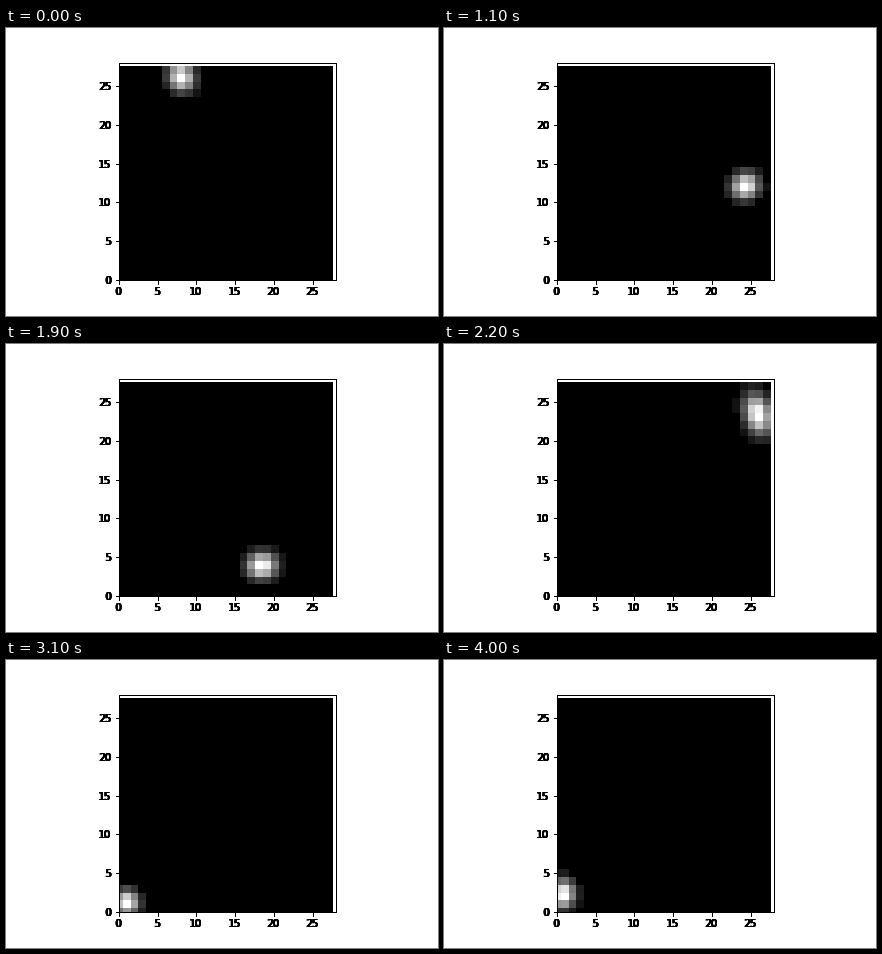
These frames come from a looping animation (432 px wide and 288 px high, 4.1 s). A matplotlib script:

```python
import numpy as np
import matplotlib.pyplot as plt
from matplotlib.animation import FuncAnimation
from matplotlib.transforms import Affine2D

SIZE = 28
FRAMES = 41
INTERVAL = 100
BASE_VAR = 1.35   # spread of a resting spot, in cells squared
BLUR = 0.02       # extra spread along the velocity
CUTOFF = 0.065

# Points where the spot turns: time step, x, y
TURNS = [
    (0, 8, 26.1), (3, 17, 2), (5, 21.5, 18.5), (6, 24, 25.5),
    (9, 3, 2), (11, 24.2, 12.1), (15, 3, 6), (16, 6, 2.3),
    (21, 26.6, 5), (22, 25.8, 23.4), (24, 17, 25), (30, 8, 5),
    (31, 0.9, 1.2), (36, 25, 25), (39, 2, 10), (40, 0.6, 2.3),
]
times, *coords = zip(*TURNS)
rows, cols = np.mgrid[:SIZE, :SIZE]


def position(step):
    return np.array([np.interp(step, times, c) for c in coords])


def spot(step):
    """Gaussian spot, smeared along its direction of travel."""
    x, y = position(step)
    velocity = (position(step + 1) - position(step - 1)) / 2
    cov = BASE_VAR * np.eye(2) + BLUR * np.outer(velocity, velocity)
    inv = np.linalg.inv(cov)
    d = np.stack([cols - x, rows - y])
    glow = np.exp(-0.5 * np.einsum("iyx,ij,jyx->yx", d, inv, d))
    glow /= glow.max()
    return np.where(glow < CUTOFF, 0, glow)


def style(ax, shift=0):
    ax.set(xlim=(0, SIZE), ylim=(0, SIZE), aspect="equal")
    ticks = range(0, SIZE, 5)
    ax.set_xticks(ticks)
    ax.set_yticks(ticks)
    for label in ax.get_xticklabels() + ax.get_yticklabels():
        label.set_transform(label.get_transform()
                            + Affine2D().translate(shift, 0))


plt.rcParams.update({"font.family": "DejaVu Sans", "font.size": 10})
fig = plt.figure(figsize=(6, 4), dpi=72, facecolor="white")
fig.subplots_adjust(left=0.125, right=0.9, bottom=0.125, top=0.88)

ax = fig.add_subplot()
image = ax.imshow(spot(0), cmap="gray", vmin=0, vmax=1,
                  origin="lower", interpolation="nearest")
style(ax)

# Stacked axes make the labels heavy and one pixel wider.
for i in range(6):
    overlay = fig.add_subplot(label=f"overlay {i}")
    overlay.patch.set_visible(False)
    style(overlay, shift=-(i % 2))


def update(step):
    image.set_data(spot(step))
    return [image]


anim = FuncAnimation(fig, update, frames=FRAMES, interval=INTERVAL,
                     repeat=True, repeat_delay=0, blit=False)
plt.show()
```
